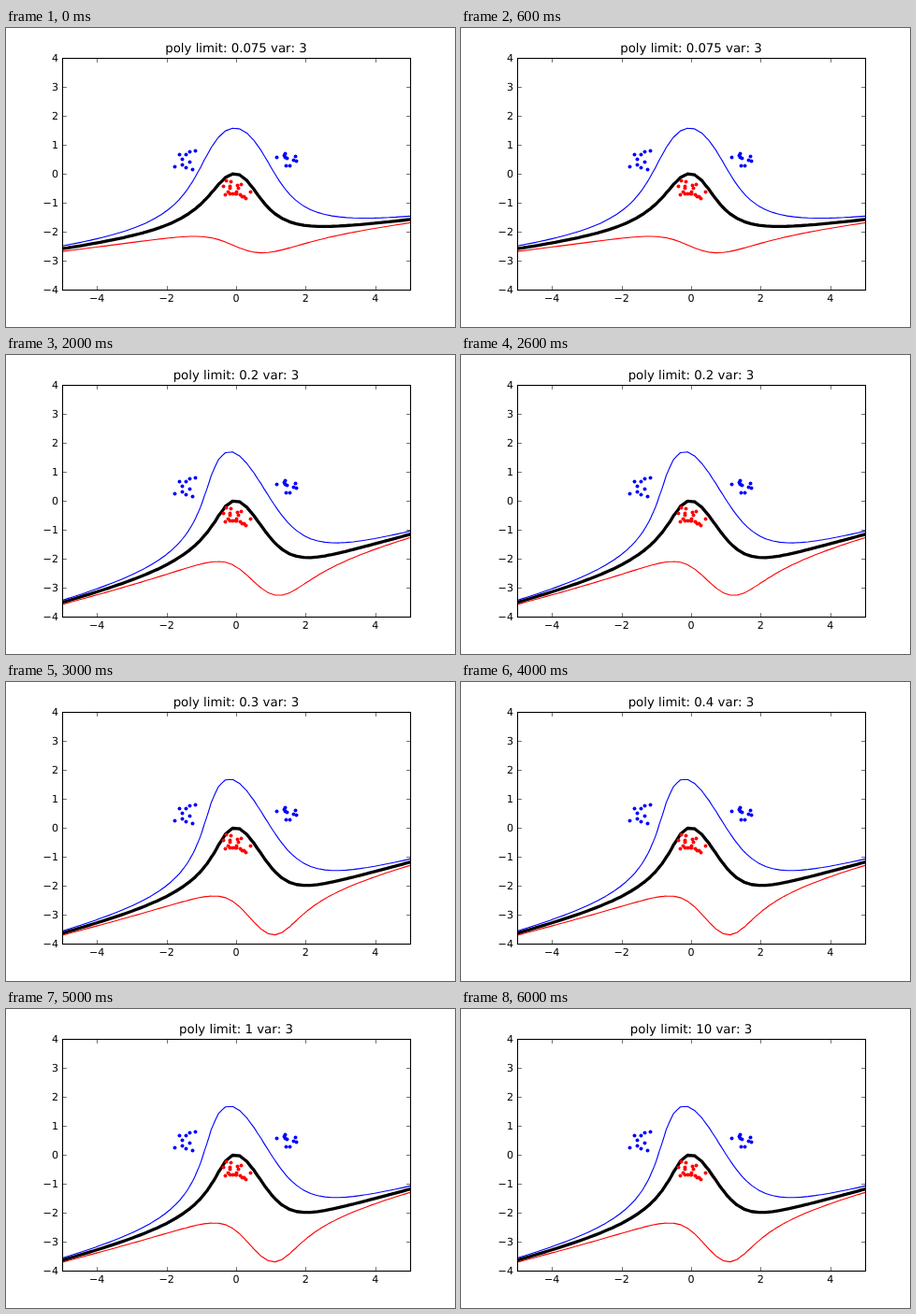
An HTML page that plays this animation: 480 by 320 pixels, repeating every 7000 ms.

```html
<!DOCTYPE html>
<html lang="en">
<head>
<meta charset="utf-8">
<title>Polynomial margin</title>
<style>
  html, body { margin: 0; width: 100%; height: 100%; overflow: hidden; background: #fff; }
  svg { display: block; width: 480px; height: 320px; }
  text { font: 11.11px "DejaVu Sans", sans-serif; font-kerning: none; text-rendering: geometricPrecision; }
  #title { font-size: 13.33px; text-anchor: middle; }
  .xl { text-anchor: middle; }
  .yl { text-anchor: end; }
  #levels path { fill: none; stroke-linecap: round; }
</style>
</head>
<body>
<svg viewBox="0 0 480 320">
  <clipPath id="plot"><rect x="60" y="32" width="372" height="248"/></clipPath>
  <g id="levels" clip-path="url(#plot)"></g>
  <g id="dots"></g>
  <g id="axes"></g>
  <text id="title" x="246" y="26"></text>
</svg>
<script>
const $ = id => document.getElementById(id);

function add(parent, tag, attrs, text) {
  const el = document.createElementNS(parent.namespaceURI, tag);
  for (const k in attrs) el.setAttribute(k, attrs[k]);
  if (text) el.textContent = text;
  parent.appendChild(el);
  return el;
}

// Plot units to pixels: x in -5..5, y in -4..4
const px = x => 246 + 37.2 * x;
const py = y => 156 - 31 * y;

// Axes
const axes = $('axes');
const label = v => v < 0 ? '\u2212' + -v : String(v);
const tick = d => add(axes, 'path', { d, stroke: '#000', 'stroke-width': 0.56 });
for (let v = -4; v <= 4; v++) {
  const y = py(v);
  if (Math.abs(v) < 4) tick(`M60.5 ${y + .5}h4.4M432.5 ${y + .5}h-4.4`);
  add(axes, 'text', { x: 56, y: y + 4, class: 'yl' }, label(v));
  if (v % 2) continue;
  tick(`M${Math.round(px(v)) + .5} 32.5v4.4m0 243.6v-4.4`);
  add(axes, 'text', { x: px(v), y: 293, class: 'xl' }, label(v));
}
add(axes, 'rect', { x: 60.5, y: 32.5, width: 372, height: 248, fill: 'none', stroke: '#000', 'stroke-width': 1.11 });

// Training samples, in pixels
const blue = [[180, 148], [185, 135], [188, 140], [188, 146], [192, 135], [192, 149], [196, 132],
  [196, 143], [199, 151], [202, 131], [289, 138], [297, 136], [298, 134], [298, 138], [299, 147],
  [300, 139], [303, 147], [307, 141], [309, 137], [310, 142]];
const red = [[235, 163], [240, 164], [232, 169], [239, 169], [239, 171], [247, 168], [251, 167],
  [248, 171], [237, 175], [239, 177], [234, 178], [242, 177], [245, 177], [246, 175], [246, 177],
  [250, 178], [252, 180], [254, 180], [256, 182], [261, 175]];

const samples = [];
function scatter(pts, t, fill) {
  for (const [cx, cy] of pts) {
    add($('dots'), 'circle', { cx: cx + .5, cy: cy + .5, r: 1.95, fill });
    samples.push({ x: (cx - 246) / 37.2, y: (156 - cy) / 31, t });
  }
}
scatter(blue, 1, '#00f');
scatter(red, -1, '#f00');

// Support vector machine with a cubic kernel
const kernel = (a, b) => (1 + a.x * b.x + a.y * b.y) ** 3;
const K = samples.map(a => samples.map(b => kernel(a, b)));

// Sequential minimal optimisation: move the worst pair until no pair violates the margin
function train(limit) {
  const n = samples.length, eps = 1e-12;
  const alpha = Array(n).fill(0), out = Array(n).fill(0);
  const rise = i => samples[i].t > 0 ? limit - alpha[i] : alpha[i];
  const fall = i => samples[i].t > 0 ? alpha[i] : limit - alpha[i];
  const err = i => samples[i].t - out[i];
  for (let step = 0; step < 20000; step++) {
    let i = -1, j = -1;
    for (let k = 0; k < n; k++) {
      if (rise(k) > eps && (i < 0 || err(k) > err(i))) i = k;
      if (fall(k) > eps && (j < 0 || err(k) < err(j))) j = k;
    }
    const gap = err(i) - err(j);
    if (gap < 1e-7) break;
    const d = Math.min(gap / (K[i][i] + K[j][j] - 2 * K[i][j] + eps), rise(i), fall(j));
    alpha[i] += samples[i].t * d;
    alpha[j] -= samples[j].t * d;
    for (let k = 0; k < n; k++) out[k] += d * (K[i][k] - K[j][k]);
  }
  const support = samples.map((s, i) => ({ ...s, w: alpha[i] * s.t })).filter(s => s.w);
  return (x, y) => support.reduce((sum, s) => sum + s.w * kernel(s, { x, y }), 0);
}

// Marching squares on a 50 by 50 grid
const N = 49;
const gx = i => -5 + 10 * i / N, gy = j => -4 + 8 * j / N;

function sampleGrid(f) {
  return Array.from({ length: N + 1 }, (_, i) => Array.from({ length: N + 1 }, (_, j) => f(gx(i), gy(j))));
}

function contour(grid, level) {
  let d = '';
  for (let i = 0; i < N; i++) for (let j = 0; j < N; j++) {
    const corners = [[i, j], [i + 1, j], [i + 1, j + 1], [i, j + 1]];
    const hits = [];
    corners.forEach(([a, b], k) => {
      const [c, e] = corners[(k + 1) % 4];
      const u = grid[a][b] - level, v = grid[c][e] - level;
      if (u > 0 === v > 0) return;
      const t = u / (u - v);
      hits.push(px(gx(a + (c - a) * t)).toFixed(2) + ' ' + py(gy(b + (e - b) * t)).toFixed(2));
    });
    for (let k = 0; k < hits.length; k += 2) d += `M${hits[k]}L${hits[k + 1]}`;
  }
  return d;
}

const levels = [
  { value: -1, stroke: '#f00', width: 1.11 },
  { value: 0, stroke: '#000', width: 3.33 },
  { value: 1, stroke: '#00f', width: 1.11 }
];
for (const l of levels) l.path = add($('levels'), 'path', { stroke: l.stroke, 'stroke-width': l.width });

// One limit per second
const limits = [0.075, 0.1, 0.2, 0.3, 0.4, 1, 10];
const scenes = limits.map(limit => {
  const grid = sampleGrid(train(limit));
  return levels.map(l => contour(grid, l.value));
});
let shown = -1;

function draw(step) {
  if (step === shown) return;
  shown = step;
  $('title').textContent = `poly limit: ${limits[step]} var: 3`;
  levels.forEach((l, i) => l.path.setAttribute('d', scenes[step][i]));
}

const start = performance.now();
function loop() {
  draw(Math.floor((performance.now() - start) / 1000) % limits.length);
  requestAnimationFrame(loop);
}
loop();
</script>
</body>
</html>
```
